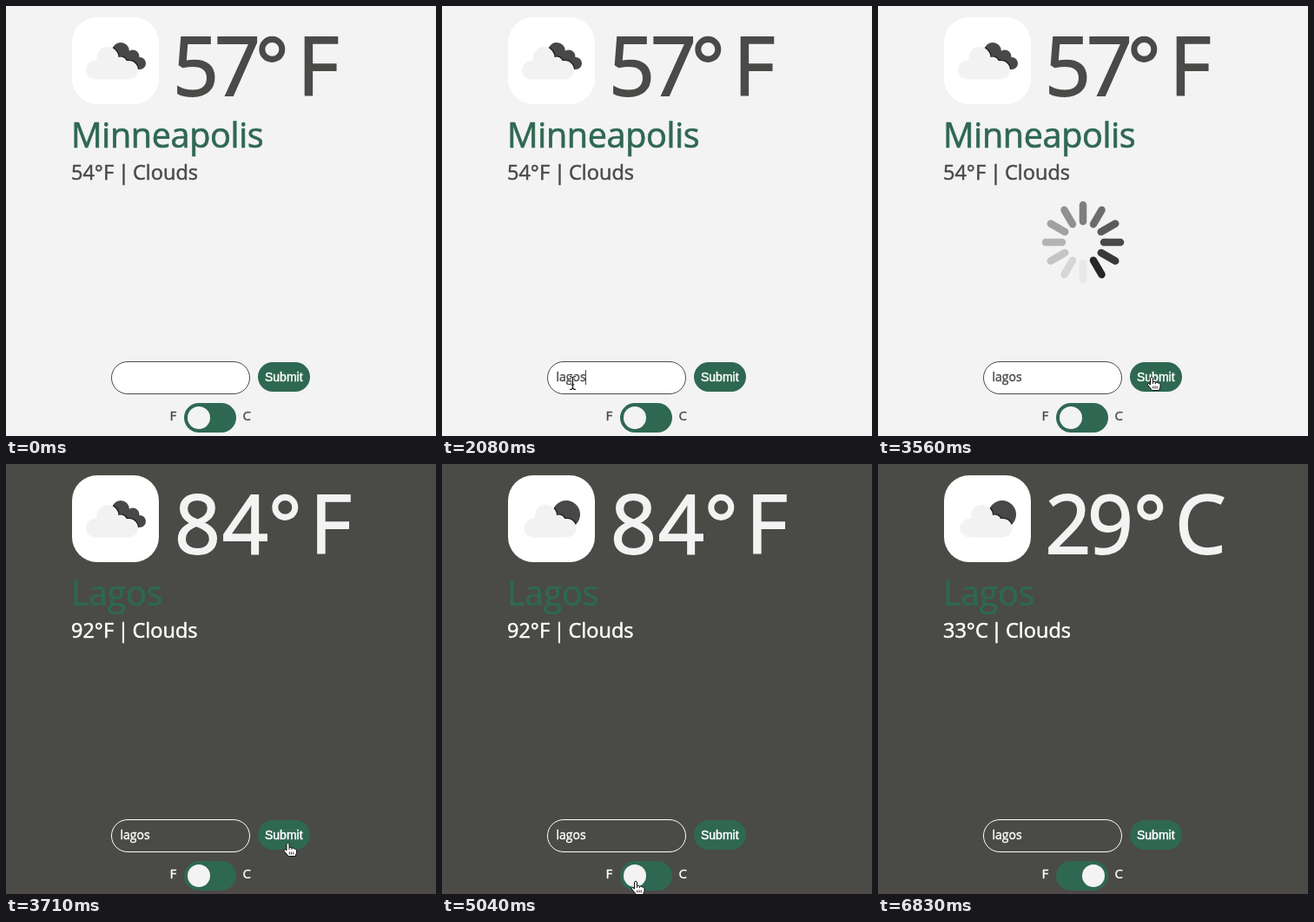
Recreate the animation shown at these times as an HTML page. Size 495 by 495 pixels, loop 7.7 s.

```html
<!DOCTYPE html>
<html lang="en">
<head>
<meta charset="utf-8">
<title>Weather</title>
<style>
  html, body { margin: 0; width: 100%; height: 100%; overflow: hidden; }
  svg { display: block; width: 100vw; height: 100vh; font-family: "Open Sans", "Noto Sans", sans-serif;
    --bg: #f3f3f3; --ink: #4a4a48; --sub: #4a4a48; --field: #fff; --green: #2f6852; background: var(--bg); }
  svg.dark { --bg: #4a4a47; --ink: #f3f3f3; --sub: #fff; --field: #4a4a47; }
  .temp { font-size: 92.5px; fill: var(--ink); stroke: var(--ink); stroke-width: 1.8px; }
  .city { font-size: 39.5px; letter-spacing: -.35px; fill: var(--green); stroke: var(--green); stroke-width: .7px; }
  .sub { font-size: 23.5px; fill: var(--sub); stroke: var(--sub); stroke-width: .55px; }
  .small { font-size: 14px; fill: var(--sub); stroke: var(--sub); stroke-width: .4px; }
  .unit { font-size: 15px; }
  .submit { font: 14px "Liberation Sans", Arial, sans-serif; fill: #fff; stroke: #fff; stroke-width: .45px; }
  .bars line { stroke-width: 8.5; stroke-linecap: round; }
  .green { fill: var(--green); }
  .back { fill: #484848; }
  .strip { fill: none; }
  .dark .strip { fill: #4e4a48; }
</style>
</head>
<body>
<svg id="stage" viewBox="0 0 495 495">
  <defs>
    <g id="cloud">
      <rect x="92" y="63" width="60" height="21.5" rx="10.7"/>
      <circle cx="117" cy="59.5" r="12.5"/>
      <circle cx="132" cy="65.5" r="7"/>
      <circle cx="141" cy="71" r="6"/>
      <rect x="104" y="62" width="24" height="18"/>
    </g>
    <clipPath id="cloudClip">
      <circle cx="132" cy="52" r="10"/><circle cx="146" cy="58" r="7.5"/>
      <circle cx="154" cy="66" r="7"/><path d="M126 58L140 50 154 73H132z"/>
    </clipPath>
    <clipPath id="sunClip"><circle cx="143" cy="58" r="16"/></clipPath>
  </defs>
  <rect class="strip" y="490" width="495" height="5"/>

  <rect x="76" y="13" width="100" height="100" rx="29" fill="#fff"/>
  <g id="clouds">
    <g clip-path="url(#cloudClip)">
      <rect class="back" x="120" y="40" width="45" height="40"/>
      <use href="#cloud" x="1" y="-1" fill="#1d1d1d"/>
    </g>
    <use href="#cloud" fill="#f2f2f2"/>
  </g>
  <g id="sun">
    <g clip-path="url(#sunClip)">
      <rect class="back" x="120" y="40" width="45" height="40"/>
      <use href="#cloud" x="3.5" y="-1" fill="#1d1d1d"/>
    </g>
    <use href="#cloud" x="2.5" fill="#f2f2f2"/>
  </g>

  <text id="temp" class="temp" y="103"></text>
  <text id="city" class="city" x="75" y="163"></text>
  <text id="feels" class="sub" x="75" y="200"></text>
  <text id="bar" class="sub" y="200" text-anchor="middle">|</text>
  <text id="sky" class="sub" y="200">Clouds</text>
  <g id="bars" class="bars" transform="translate(236 272)"></g>

  <rect x="121.5" y="409.5" width="159" height="37" rx="18.5" fill="var(--field)" stroke="var(--sub)"/>
  <text id="typed" class="small" x="131.5" y="432"></text>
  <rect id="caret" y="419" width="1" height="17" fill="var(--sub)"/>
  <rect class="green" x="290" y="410" width="60" height="34" rx="17"/>
  <text class="submit" x="298" y="432">Submit</text>

  <text class="small unit" x="188.5" y="477">F</text>
  <text class="small unit" x="272.5" y="477">C</text>
  <rect class="green" x="205" y="457" width="60" height="34" rx="17"/>
  <circle id="knob" cy="474" r="13" fill="#f3f3f3"/>

  <g id="pointer" stroke-linejoin="round">
    <g id="beam" fill="none">
      <path d="M-3.5 -7.5Q0 -7.5 0 -5V5Q0 7.5 -3.5 7.5M3.5 -7.5Q0 -7.5 0 -5V5Q0 7.5 3.5 7.5M-2 2H2" stroke="#fff" stroke-width="2.6"/>
      <path d="M-3.5 -7.5Q0 -7.5 0 -5V5Q0 7.5 -3.5 7.5M3.5 -7.5Q0 -7.5 0 -5V5Q0 7.5 3.5 7.5M-2 2H2" stroke="#111" stroke-width="1.2"/>
    </g>
    <path id="arrow" d="M0 0V14.5L3.4 11.4 5.8 16.8 8.2 15.8 5.9 10.6H10.6Z" fill="#111" stroke="#fff"/>
    <g id="hand" stroke="#111">
      <path d="M-1.5 1.2Q0 -.8 1.5 1.2V5.8Q3.2 4.8 4.5 6.2 6.2 5.4 7.3 7 9.4 6.4 10 8.6V11.5L8.5 15.5H.6L-4.2 9.8Q-5.2 7.6 -3.4 7.4L-1.5 9Z" fill="#fff"/>
      <path d="M1.8 10.5V13.5M4 10.5V13.5M6.2 10.5V13.5M1.5 5.8V8M4.5 6.2V8.2" fill="none" stroke-width=".9"/>
    </g>
  </g>
</svg>
<script>
const LOOP = 7700;
const $ = id => document.getElementById(id);
const show = (id, on) => $(id).style.display = on ? '' : 'none';

// Each row: start time, then values held until the next row.
const reports = [
  [0, '57°F', '192 240 286.5 335.5', 'Minneapolis', '54°F', 135.5, 146],
  [3710, '84°F', '194 249 301.5 350', 'Lagos', '92°F', 135, 145.5],
  [5790, '29°C', '192.5 241 293.5 342', 'Lagos', '33°C', 136.5, 147]
];
const typing = [[0, ''], [1640, 'l'], [1790, 'lag'], [1930, 'lago'], [2080, 'lagos']];
const knobs = [[0, 222], [5790, 228], [5940, 243], [6080, 248]];
const carets = [[0, 0], [590, 132], [1190, 0], [1640, 136], [1790, 151], [1930, 158], [2080, 165], [2680, 0]];
const moves = [
  [0, ''],
  [300, 'arrow', 150, 456], [440, 'arrow', 155, 450], [590, 'beam', 157, 448],
  [890, 'beam', 151, 438], [1190, 'beam', 150.5, 434],
  [2680, 'beam', 172, 431], [2830, 'beam', 222, 423], [2970, 'beam', 264.5, 416],
  [3120, 'hand', 301, 421], [3270, 'hand', 314, 427], [3410, 'hand', 315, 427],
  [3710, 'hand', 324.5, 436], [4160, 'hand', 318, 438], [4310, 'arrow', 297, 451],
  [4450, 'arrow', 272, 464], [4600, 'hand', 248, 474], [4750, 'hand', 231, 479],
  [4890, 'hand', 225, 480], [5040, 'hand', 223, 480], [6680, 'hand', 223, 488], [6830, '']
];

const at = (rows, t) => rows.filter(r => r[0] <= t).pop();

const bars = Array.from({ length: 12 }, (_, i) => {
  const line = document.createElementNS('http://www.w3.org/2000/svg', 'line');
  line.setAttribute('y1', -24);
  line.setAttribute('y2', -43);
  line.setAttribute('transform', `rotate(${i * 30})`);
  return $('bars').appendChild(line);
});

function spin(head) {
  bars.forEach((bar, i) => {
    const age = (head - i + 12) % 12;
    const g = Math.round(38 + age * 17.6);
    bar.setAttribute('stroke', `rgb(${g},${g},${g})`);
  });
}

function render(t) {
  const [, temp, xs, city, feels, barX, skyX] = at(reports, t);
  $('stage').classList.toggle('dark', t >= 3710);
  $('temp').textContent = temp;
  $('temp').setAttribute('x', xs);
  $('city').textContent = city;
  $('feels').textContent = feels;
  $('bar').setAttribute('x', barX);
  $('sky').setAttribute('x', skyX);
  show('clouds', t < 4160);
  show('sun', t >= 4160);

  show('bars', t >= 3410 && t < 3710);
  spin(t < 3560 ? 3 : 5);

  $('typed').textContent = at(typing, t)[1];
  const caret = at(carets, t)[1];
  show('caret', caret);
  $('caret').setAttribute('x', caret);
  $('knob').setAttribute('cx', at(knobs, t)[1]);

  const [, kind, x = 0, y = 0] = at(moves, t);
  for (const id of ['beam', 'arrow', 'hand']) show(id, id === kind);
  $('pointer').setAttribute('transform', `translate(${x} ${y})`);
}

const start = performance.now();
function tick() {
  render((performance.now() - start) % LOOP);
  requestAnimationFrame(tick);
}
render(0);
requestAnimationFrame(tick);
</script>
</body>
</html>
```
